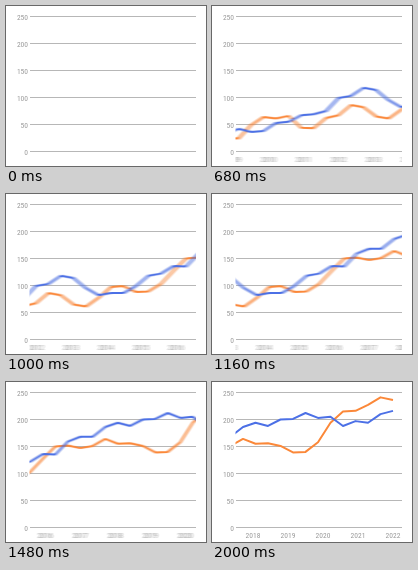
These frames come from a looping animation (200x160 px, 3000 ms). An HTML page with a canvas:

```html
<!DOCTYPE html>
<html lang="en">
<head>
<meta charset="utf-8">
<title>Scrolling line chart</title>
<style>
  html, body { margin: 0; width: 100%; height: 100%; overflow: hidden; background: #fff; }
  canvas { display: block; width: 200px; height: 160px; }
</style>
</head>
<body>
<canvas id="chart" width="200" height="160"></canvas>
<script>
const W = 200, H = 160;
const LOOP = 3000, STEP = 40, END = 2000;
const SHUTTER = 20, SAMPLES = 12;
const LEFT = 24, RIGHT = 190, LAST_X = 181;
const POINT_GAP = 12.5, YEAR_GAP = 35;
const FONT = '7.5px "Roboto Condensed", Roboto, sans-serif';

const series = [
  { color: '#fb8839', values: [
    0, 20, 19, 25, 24, 49, 64, 61, 66, 44, 43, 62, 67, 86, 82, 65, 61, 77, 97, 99, 88,
    89, 103, 127, 150, 152, 147, 151, 164, 155, 156, 151, 139, 140, 158, 194, 215, 216, 227, 241, 236] },
  { color: '#4c70e6', values: [
    0, 12, 31, 33, 42, 36, 38, 53, 55, 67, 69, 75, 99, 103, 118, 114, 95, 82, 86, 86, 99,
    118, 122, 136, 135, 159, 168, 168, 186, 194, 188, 200, 201, 212, 203, 205, 188, 197, 194, 210, 216] }
];

const view = document.getElementById('chart').getContext('2d');
const buffer = document.createElement('canvas');
buffer.width = W;
buffer.height = H;
const ctx = buffer.getContext('2d');

const yOf = v => 145.5 - v * 0.54;

// Pixels still to scroll: steady at first, then slowing down.
function remaining(t) {
  if (t >= END) return 0;
  if (t < 1000) return 199 + (1000 - t) * 0.302;
  const u = (END - t) / 1000;
  return 199 * u * (0.113 + u * (1.232 - 0.345 * u));
}

function drawAxis() {
  ctx.font = FONT;
  ctx.textBaseline = 'alphabetic';
  ctx.textAlign = 'right';
  ctx.fillStyle = '#999';
  for (let v = 0; v <= 250; v += 50) ctx.fillText(v, 22, yOf(v) + 3);
  ctx.fillStyle = '#b7b7b7';
  for (let v = 0; v <= 250; v += 50) ctx.fillRect(LEFT, yOf(v) - 0.5, RIGHT - LEFT, 1);
}

function drawYears(shift) {
  ctx.textAlign = 'center';
  ctx.fillStyle = '#999';
  for (let year = 2008; year <= 2022; year++) {
    ctx.fillText(year, LAST_X + shift - (2022 - year) * YEAR_GAP, 155.5);
  }
}

function drawLine({ color, values }, shift) {
  const start = LAST_X + shift - (values.length - 1) * POINT_GAP;
  ctx.beginPath();
  values.forEach((v, i) => ctx.lineTo(start + i * POINT_GAP, yOf(v)));
  ctx.strokeStyle = color;
  ctx.lineWidth = 2;
  ctx.lineJoin = 'round';
  ctx.stroke();
}

function drawScene(shift) {
  ctx.fillStyle = '#fff';
  ctx.fillRect(0, 0, W, H);
  drawAxis();
  if (shift === null) return;
  ctx.save();
  ctx.beginPath();
  ctx.rect(LEFT - 0.5, 0, RIGHT - LEFT + 0.5, H);
  ctx.clip();
  drawYears(shift);
  series.forEach(s => drawLine(s, shift));
  ctx.restore();
}

// Average several moments of the scene as motion blur.
function render(t) {
  const moving = t > 0 && t < END;
  const count = moving ? SAMPLES : 1;
  for (let i = 0; i < count; i++) {
    const offset = moving ? ((i + 0.5) / count - 0.5) * SHUTTER : 0;
    drawScene(t > 0 ? remaining(t + offset) : null);
    view.globalAlpha = 1 / (i + 1);
    view.drawImage(buffer, 0, 0);
  }
}

let shown = -1;
function tick() {
  const t = Math.floor(performance.now() % LOOP / STEP) * STEP;
  if (t !== shown) render(shown = t);
  requestAnimationFrame(tick);
}
tick();
</script>
</body>
</html>
```
